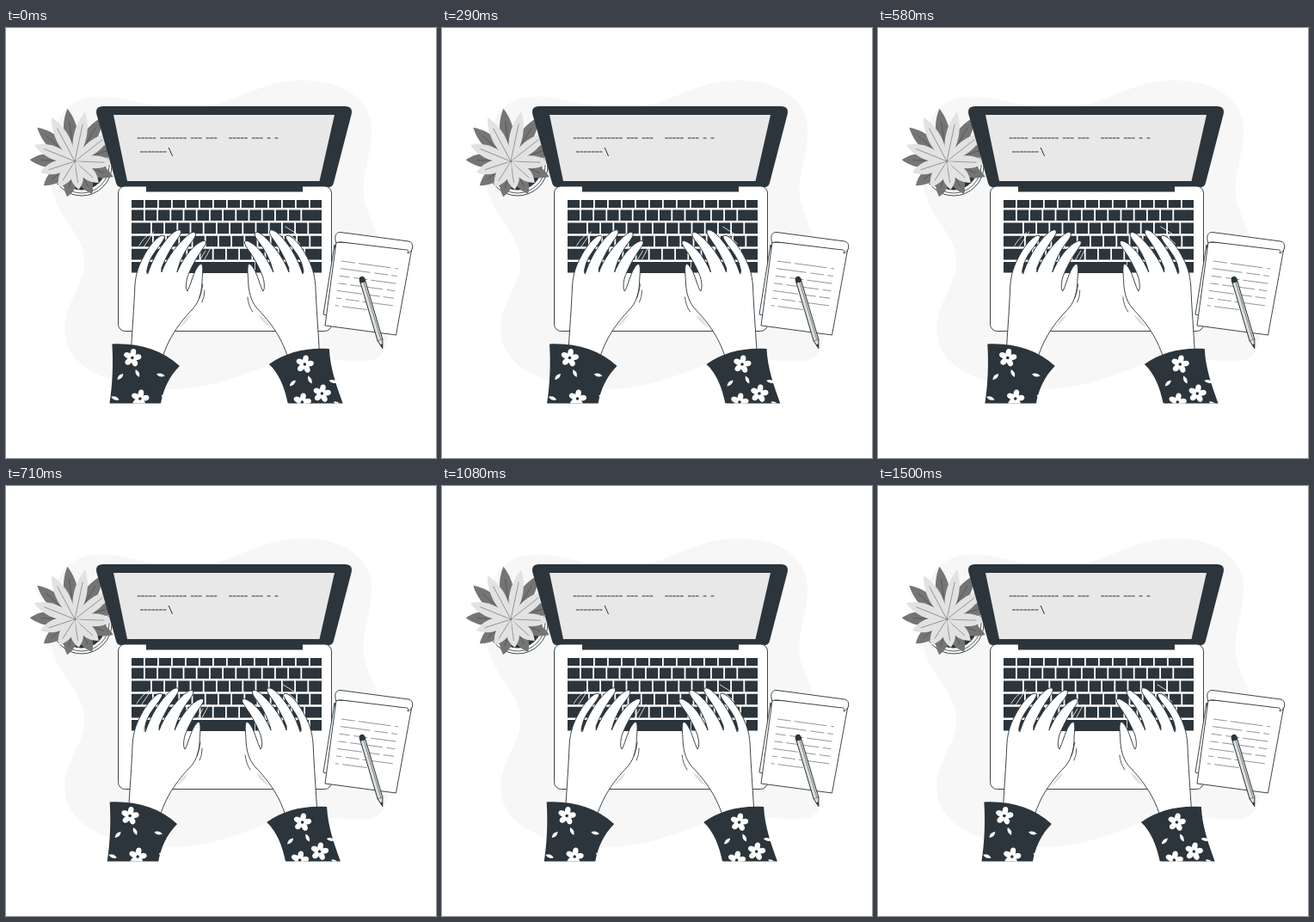
Recreate the animation shown at these times as an HTML page. Size 500 by 500 pixels, loop 1.54 s.

```html
<!DOCTYPE html>
<html lang="en">
<head>
<meta charset="utf-8">
<title>Typing hands</title>
<style>
html, body { margin: 0; width: 100%; height: 100%; overflow: hidden; background: #fff; }
svg { display: block; width: 100%; height: 100%; }
.line { fill: none; stroke: #263238; stroke-width: .8; stroke-linecap: round; stroke-linejoin: round; }
.paper { fill: #fff; stroke: #263238; stroke-width: .9; stroke-linejoin: round; }
.dark { fill: #2c353b; }
</style>
</head>
<body>
<svg viewBox="0 0 500 500">
  <defs>
    <clipPath id="floor"><path d="M0 0H500V436.5H0Z"/></clipPath>
    <path id="hand" class="paper" d="M145 384C147 350 149 325 150 300C151 285 155 275 160 266C165 256 172 247 178 243C182 240 186 241 184 245C180 253 170 262 166 274C164 281 163 285 165 286C167 279 173 264 182 252C188 244 195 236 200 235C205 234 204 239 201 243C193 254 186 266 181 279L181 284C186 270 196 256 206 246C212 240 217 236 220 238C222 240 219 245 215 250C208 259 202 271 199 284C203 275 209 264 217 256C223 250 230 246 232 248C234 250 230 255 226 261C219 271 213 284 211 290C209 297 209 304 211 306C214 301 216 292 220 283C223 277 226 273 228 275C230 279 228 290 228 298C227 310 224 320 216 328C203 342 188 360 180 390Z"/>
    <g id="flower">
      <g id="petals" fill="#fff"></g>
      <circle class="dark" r="1.8"/>
    </g>
    <path id="petal" fill="#fff" d="M-5 0Q0-4 5 0Q0 4-5 0"/>
    <g id="print">
      <use href="#flower"/>
      <use href="#petal" transform="translate(-14 22) rotate(-45)"/>
      <use href="#petal" transform="translate(6 18) rotate(65)"/>
      <use href="#petal" transform="translate(33 20) rotate(12)"/>
      <use href="#petal" transform="translate(-20 47) rotate(20)"/>
      <use href="#petal" transform="translate(38 46) rotate(30)"/>
    </g>
  </defs>

  <path fill="#f7f7f7" d="M52 180C47 140 54 92 91 82C130 73 155 92 205 94C265 95 285 61 345 61C398 61 427 88 425 122C424 155 410 180 418 205C428 235 446 270 446 305C446 350 448 385 420 387C375 389 345 377 300 394C260 409 230 420 190 420C145 420 75 405 69 358C64 320 94 300 91 268C88 235 57 220 52 180Z"/>

  <g id="plant">
    <circle class="paper" cx="88" cy="160" r="35"/>
    <circle class="line" cx="88" cy="160" r="32"/>
    <circle class="dark" cx="88" cy="160" r="28.5"/>
  </g>

  <path class="dark" d="M113 91H394Q404 91 401.500 101L381 180Q380 185 375 185H134Q129 185 128 180L105.500 101Q103 91 113 91Z"/>
  <path fill="#e8e8e8" d="M125 101H382L364.500 178H141Z"/>
  <path class="line" id="code" style="stroke-width:1;stroke-linecap:butt"/>
  <rect class="paper" x="130.500" y="184" width="248" height="168.500" rx="8"/>
  <path class="dark" d="M163 184H345V190.500H163Z"/>
  <path class="dark" id="keys"/>

  <g class="paper">
    <path d="M382 252L369 333L400 340Z"/>
    <path d="M384 249L371 346L453.500 357L472.500 253Z"/>
    <path d="M384 250C381 242 384 237 389 237.500L468 248C475 249 474 260 467 262C469 257 466 258 461 257.500L391 249C387 248.500 386 249 384 250Z"/>
  </g>
  <g class="line" id="notes" style="stroke:#666;stroke-width:.7;stroke-linecap:butt"></g>
  <g transform="translate(414 292) rotate(-16.500)">
    <path d="M-3 0H3V74L0 84L-3 74Z" fill="#ddd" stroke="#263238" stroke-width=".9"/>
    <path class="line" d="M1 4V73M-3 74H3" style="stroke-width:.5"/>
    <path class="dark" d="M-3.200 4V0A3.200 3.200 0 0 1 3.200 0V4ZM-1.500 79H1.500L0 84Z"/>
  </g>

  <g clip-path="url(#floor)">
    <g id="hands">
      <path d="M293 333Q300 345 308 348L300 337ZM216 333Q209 345 202 348L210 337Z" fill="#e0e0e0"/>
      <use href="#hand"/>
      <use href="#hand" transform="translate(510) scale(-1 1)"/>
      <path class="line" d="M229 298Q228 306 225 314M231 305Q231 313 228 319M281 313Q282 323 287 330M283 320"/>
      <path class="line" style="stroke:#fff" d="M155 253Q160 244 169 238M160 255L172 237M231 269L239 254M225 271L232 259M325 231L341 241M329 239L342 251"/>
      <path class="dark" d="M123.500 367.500C154 366 181 374 202 393C190 405 183 420 180 437H120.500C124 415 125 390 123.500 367.500Z"/>
      <path class="dark" d="M306 391C325 377 350 371 376 373C377 395 384 415 392 437H328C324 418 318 402 306 391Z"/>
      <use href="#print" x="147" y="383.500"/>
      <use href="#flower" x="156" y="431"/>
      <use href="#print" x="347.500" y="391"/>
      <use href="#flower" x="367.500" y="425"/>
      <use href="#flower" x="344.500" y="435"/>
    </g>
  </g>
</svg>
<script>
const $ = id => document.getElementById(id);
const add = (id, markup) => $(id).insertAdjacentHTML('beforeend', markup);
const rad = degrees => degrees * Math.PI / 180;

// Keyboard: each row starts with a key of its own width, the last key fills up the row
const LEFT = 146, RIGHT = 367, GAP = 1.8;
let keys = 'M210 272H289V285H210Z';
[14, 14, 22, 24, 33, 14].forEach((lead, row) => {
  const y = row ? 196.4 + row * 15.1 : 200, h = row ? 12.6 : 9;
  const pitch = row % 5 ? 15.2 : 16;
  for (let x = LEFT, w = lead; x < RIGHT; x += w + GAP, w = pitch - GAP) {
    if (RIGHT - x - w < pitch * .7) w = RIGHT - x;
    keys += `M${x} ${y}h${w}v${h}h${-w}Z`;
  }
});
$('keys').setAttribute('d', keys);

const dashes = (text, x, y) => [...text].map((c, i) =>
  c == '-' ? `M${x + i * 4.44} ${y}h3.8` : c == '\\' ? `M${x + i * 4.44 + 2} ${y - 5}l4.500 10` : '').join('');
$('code').setAttribute('d',
  dashes('----- ------- --- ---   ----- --- - -', 152.7, 128) + dashes('-------\\', 156, 144));

// Handwriting: slanted broken lines, the last one short
for (let i = 0; i < 7; i++)
  add('notes', `<path d="M${390 - i * 1.2} ${271 + i * 8.6}l${i < 6 ? '66 8.900' : '37 5'}" stroke-dasharray="16 4 38 5" stroke-dashoffset="${i * 23}"/>`);

// Plant: a ring of light leaves over a ring of dark ones, longer towards the top
function leaves(count, first, length, lift, width, fill) {
  for (let i = 0; i < count; i++) {
    const a = first + i * 40, len = length - lift * Math.sin(rad(a));
    add('plant', `<g transform="translate(80 155) rotate(${a})">
      <path fill="${fill}" d="M0 0C${len * .3} ${-width} ${len * .7} ${-width} ${len} 0C${len * .7} ${width} ${len * .3} ${width} 0 0Z"/>
      <path class="line" style="stroke-width:.4" d="M0 0H${len * .75}"/></g>`);
  }
}
leaves(9, -58, 52, 10, 11, '#757575');
leaves(9, -78, 46, 13, 10, '#e2e2e2');

for (let a = 10; a < 360; a += 72)
  add('petals', `<ellipse cy="-5.8" rx="3.3" ry="4.800" transform="rotate(${a})"/>`);

// Sideways shake: ten swings that grow and die away, shown at 24 pictures a second
const FPS = 24, LOOP = 1540, SWING = 150;
function stop(i) {
  const size = Math.min(4, Math.floor(2 ** (Math.min(i, 10 - i) - 1)));
  return i % 2 ? -size : size;
}
function shake(ms) {
  const p = ms % (SWING * 10) / SWING, i = Math.floor(p);
  return stop(i) + (stop(i + 1) - stop(i)) * (p - i);
}
const start = performance.now();
function draw() {
  const t = (performance.now() - start) % LOOP;
  const step = Math.floor((t + 5) * FPS / 1000);
  $('hands').setAttribute('transform', `translate(${shake((step + .5) * 1000 / FPS)})`);
  requestAnimationFrame(draw);
}
draw();
</script>
</body>
</html>
```
